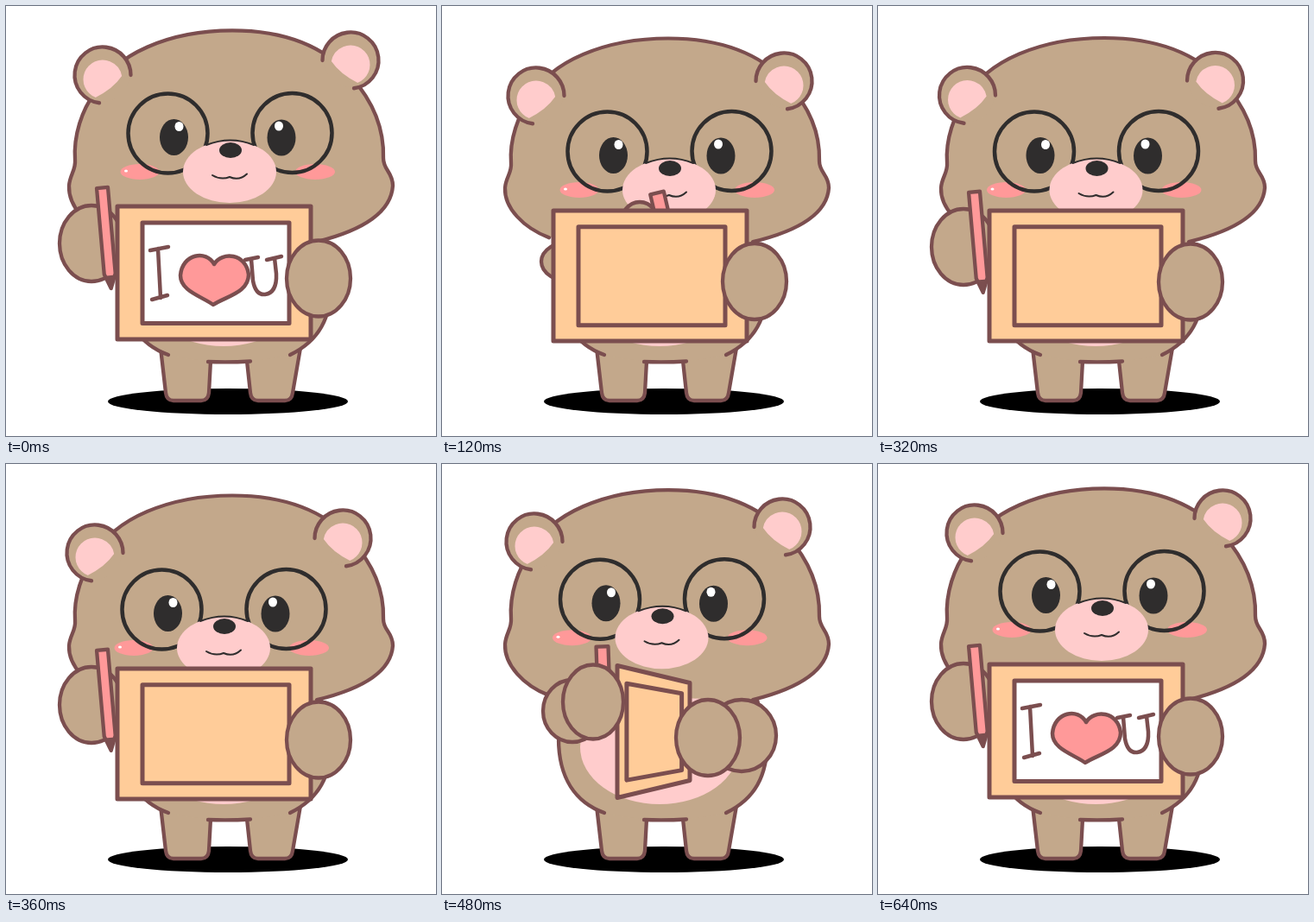
An HTML page with a canvas for the animation above (800 ms loop, 498x498 px).

```html
<!DOCTYPE html>
<html lang="en">
<head>
<meta charset="utf-8">
<title>Bear with a card</title>
<style>
html, body { margin: 0; width: 100%; height: 100%; overflow: hidden; background: #fff; }
canvas { display: block; width: 498px; height: 498px; }
</style>
</head>
<body>
<canvas id="stage" width="498" height="498"></canvas>
<script>
const ctx = document.getElementById('stage').getContext('2d');
const LOOP = 800, STEP = 40, LAST = 640;
const FUR = '#c3a88b', LINE = '#7b4e4f', PINK = '#ffcccc', ROSE = '#ff9999',
      WOOD = '#ffcc99', DARK = '#2f2d2d', WHITE = '#ffffff';
const rad = deg => deg * Math.PI / 180;

// time, face x, face y, ear x, ear y, head drop
const HEAD = [
  [40, 7, 21, -1, 24, 9.5], [120, 4, 21, -3, 24, 9.5], [200, -2, 21, -6, 24, 9.5],
  [280, -6, 21, -8, 24, 9.5], [360, -7, 21, -9, 23, 8.5], [440, -6, 13, -7, 14, 3],
  [520, -3, 5.5, -3, 6, 1.2], [560, -1.5, 2.5, -1.5, 3.5, 0.6], [640, 0, 0, 0, 0, 0.4]
];
// time, left, right, left height, right height, middle y, left hand x, right hand x
const CARD = [
  [360, 129, 353, 151, 151, 312.5, 150, 362], [400, 150, 338, 152, 140, 311, 160, 345],
  [440, 170, 322, 153, 128, 310, 171, 323], [480, 203, 287, 153, 113, 310, 175, 308],
  [520, 232, 254, 110, 152, 310, 179, 306], [560, 190, 297, 88, 155, 311, 181, 316],
  [600, 158, 328, 118, 155, 310, 181, 338], [640, 129, 353, 154, 154, 309, 150, 362]
];

function sample(keys, t) {
  const next = keys.findIndex(k => k[0] >= t);
  if (next <= 0) return keys[next < 0 ? keys.length - 1 : 0].slice(1);
  const a = keys[next - 1], b = keys[next];
  const mix = (t - a[0]) / (b[0] - a[0]);
  return a.slice(1).map((v, i) => v + (b[i + 1] - v) * mix);
}

function paint(fill, stroke, width = 4.3) {
  if (fill) { ctx.fillStyle = fill; ctx.fill(); }
  if (stroke) { ctx.strokeStyle = stroke; ctx.lineWidth = width; ctx.stroke(); }
}

function oval(x, y, rx, ry, fill, stroke, width) {
  ctx.beginPath();
  ctx.ellipse(x, y, rx, ry, 0, 0, Math.PI * 2);
  paint(fill, stroke, width);
}

function shape(d, fill, stroke, width = 4.3) {
  const path = new Path2D(d);
  if (fill) { ctx.fillStyle = fill; ctx.fill(path); }
  if (stroke) { ctx.strokeStyle = stroke; ctx.lineWidth = width; ctx.stroke(path); }
}

function at(x, y, draw, angle = 0) {
  ctx.save();
  ctx.translate(x, y);
  ctx.rotate(rad(angle));
  draw();
  ctx.restore();
}

function drawBody() {
  oval(257, 458, 139, 15, '#000');
  shape('M179 396 L185 448 Q186 457 194 457 H226 Q234 457 235 448 L237 411', FUR, LINE);
  shape('M279 411 L283 448 Q284 457 292 457 H323 Q331 457 332 448 L341 396', FUR, LINE);
  shape('M188 404 C155 392 135 364 135 318 L150 262 H362 L378 318 C377 362 362 388 329 404 Q295 412 258 412 Q220 412 188 404 Z', FUR);
  shape('M188 404 C155 392 135 364 135 318 L150 262 M362 262 L377 318 C377 362 362 388 329 404 M234 412 Q258 413 283 411.5', null, LINE);
  oval(252, 328, 92, 66, PINK);
}

function drawEar(x, y, flip) {
  ctx.save();
  ctx.translate(x, y);
  ctx.scale(flip, 1);
  oval(0, 0, 31, 31, FUR);
  ctx.beginPath();
  ctx.arc(0, 0, 32.5, rad(97), rad(360));
  paint(null, LINE);
  ctx.beginPath();
  ctx.arc(0, 5, 22.5, rad(112), rad(350));
  ctx.quadraticCurveTo(12, 16, -8.4, 26);
  paint(PINK);
  ctx.restore();
}

function drawFace(x, y) {
  at(x, y, () => {
    oval(155, 192, 22.5, 9, ROSE);
    oval(358, 192, 23, 9, ROSE);
    oval(139, 191, 2, 1.5, WHITE);
    oval(187.5, 147.5, 46, 46, null, DARK, 4.5);
    oval(331.5, 147, 46, 46, null, DARK, 4.5);
    oval(259, 192, 54, 36, PINK);
    shape('M232 161 Q260 150 287 161', null, DARK, 2);
    oval(194.5, 152, 16.5, 21, DARK);
    oval(319, 152.5, 16.5, 21, DARK);
    oval(200.5, 139.5, 5, 5.5, WHITE);
    oval(316, 139, 5, 5.5, WHITE);
    oval(260, 167, 13, 9, DARK);
    shape('M239 196 Q249 202 259 198 Q270 203 279 194.5', null, DARK, 2);
  });
}

function drawHead([faceX, faceY, earX, earY, drop]) {
  ctx.save();
  ctx.translate(0, 275);
  ctx.scale(1, (247 - drop) / 247);
  ctx.translate(0, -275);
  shape('M124 268 C94 256 72 232 73 208 C74 195 81 190 80 178 C78 150 88 120 103 100 C125 55 190 28 262 28 C330 28 372 50 400 82 C425 110 438 140 437 176 C437 190 448 192 448 208 C446 240 412 260 360 273', FUR, LINE);
  ctx.restore();
  drawEar(112 + earX, 80 + earY, 1);
  drawEar(399 + earX, 63 + earY, -1);
  drawFace(faceX, faceY);
}

// Everything on the card is given in flat pixel space and bent by the card's edges.
function drawCard([left, right, hl, hr, mid], front) {
  let depth = 1;
  const map = (x, y) => {
    const flat = (x - 129) / 224, v = (y - 309) / 154;
    const u = flat * depth / (1 - flat + flat * depth);
    return [left + (right - left) * u, mid + (hl + (hr - hl) * u) * v];
  };
  const bent = (parts, fill, width = 4.5) => {
    ctx.beginPath();
    for (const [op, ...p] of parts) {
      const q = [];
      for (let i = 0; i < p.length; i += 2) q.push(...map(p[i], p[i + 1]));
      ctx[{ M: 'moveTo', L: 'lineTo', Q: 'quadraticCurveTo', C: 'bezierCurveTo', Z: 'closePath' }[op]](...q);
    }
    paint(fill, LINE, width);
  };
  const box = (l, t, r, b, fill) =>
    bent([['M', l, t], ['L', r, t], ['L', r, b], ['L', l, b], ['Z']], fill, 5);

  box(129, 232, 353, 386, WOOD);
  box(158, 251, 328, 367.5, front ? WHITE : WOOD);
  if (!front) return;
  depth = (hl / hr) ** 0.7;
  bent([['M', 167, 283], ['L', 188, 279], ['M', 176, 281], ['L', 179, 338],
        ['M', 169, 340], ['L', 187, 335]]);
  bent([['M', 241, 299], ['C', 232, 282, 204, 287, 202, 312],
        ['C', 202, 330, 226, 336, 240, 346], ['C', 255, 336, 281, 332, 281, 311],
        ['C', 278, 286, 250, 284, 241, 299], ['Z']], ROSE);
  bent([['M', 277, 294], ['L', 292, 291], ['M', 284, 293], ['L', 286, 318],
        ['Q', 289, 335, 300, 334], ['Q', 314, 332, 313, 310], ['L', 311, 292],
        ['M', 302, 294], ['L', 319, 290]]);
}

function drawPencil() {
  shape('M-6.5 0 H6.5 V100 L0 117 L-6.5 100 Z', ROSE, LINE);
  shape('M-6 102 H6 L0 117 Z', LINE);
}

const hand = (x, y) => oval(x, y, 37, 44, FUR, LINE);

function drawResting(card, front, y) {
  hand(99, 275 + y);
  at(111.5, 210.5 + y * 1.2, drawPencil, -5);
  drawCard(card, front);
  hand(362, 315.5 + y);
}

function drawWriting(card, faceX) {
  const swing = faceX + 2, x = 243 + swing;
  oval(152, 296, 37, 24, FUR, LINE);
  oval(x - 20, 255, 23, 28, FUR, LINE);
  at(x, 216.5, () => shape('M-8 0 H8 V40 H-8 Z', ROSE, LINE), -swing * 2.2);
  drawCard(card, false);
  hand(362, 319);
}

function drawTurning(card, front) {
  const [, , , , , leftHand, rightHand] = card;
  oval(151, 286, 34, 36, FUR, LINE);
  oval(347, 314.5, 40, 41.5, FUR, LINE);
  if (front) hand(leftHand, 275);
  at(front ? 193 : 185.5, 211.5, () =>
    shape('M-7 0 H7 V55 H-7 Z', ROSE, LINE), front ? -6 : -2);
  drawCard(card, front);
  if (!front) oval(leftHand, 275.5, 35, 43, FUR, LINE);
  hand(rightHand, 317);
}

function render(now) {
  const t = Math.min(LAST, Math.floor(now % LOOP / STEP) * STEP);
  const resting = t === 0 || t === LAST;
  const pose = resting ? LAST : t;
  const head = sample(HEAD, pose), card = sample(CARD, pose);

  ctx.fillStyle = WHITE;
  ctx.fillRect(0, 0, 498, 498);
  ctx.lineCap = ctx.lineJoin = 'round';
  drawBody();
  drawHead(head);
  if (resting) drawResting(card, true, 0);
  else if (t < 320) drawWriting(card, head[0]);
  else if (t <= 360) drawResting(card, false, 4);
  else drawTurning(card, t >= 520);
}

function tick() {
  render(performance.now());
  requestAnimationFrame(tick);
}
tick();
</script>
</body>
</html>
```
